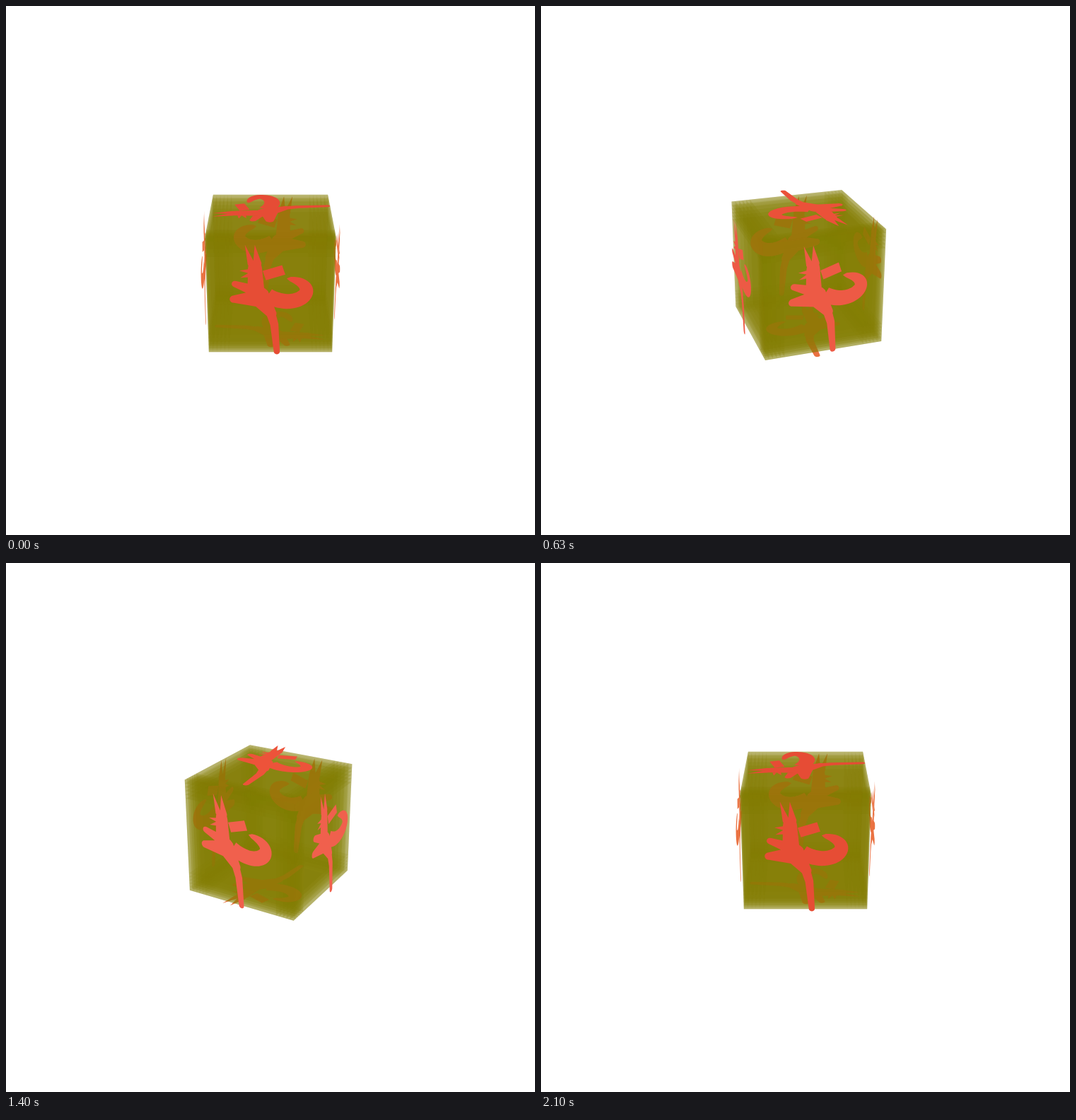
Write an HTML page with a canvas that moves like this. It is 748 by 748 pixels and loops after 2.17 s.

```html
<!DOCTYPE html>
<html lang="en">
<head>
<meta charset="utf-8">
<title>Rotating cube</title>
<style>
html, body { margin: 0; width: 100%; height: 100%; overflow: hidden; background: #fff; }
canvas { display: block; width: 748px; height: 748px; }
</style>
</head>
<body>
<canvas id="stage" width="748" height="748"></canvas>
<script>
const ctx = document.getElementById('stage').getContext('2d');
const MID = 374, VIEW = 1160, HALF = 84, FLOAT = 93.5;
const LAYERS = 6, GAP = 5.4;
const STEP = 70, STEPS = 31, TURN = Math.PI / 15;
const TILT = 24.3 * Math.PI / 180, C = Math.cos(TILT), S = Math.sin(TILT);

// Tapered limb from a to b with a radius at each end; one arc step leaves the ends flat.
function limb(ax, ay, ar, bx, by, br, arcSteps = 8) {
  const dir = Math.atan2(by - ay, bx - ax);
  const arc = (x, y, r, from) => Array.from({ length: arcSteps + 1 }, (_, i) => {
    const t = from + Math.PI * i / arcSteps;
    return [x + r * Math.cos(t), y + r * Math.sin(t)];
  });
  return [...arc(ax, ay, ar, dir + Math.PI / 2), ...arc(bx, by, br, dir - Math.PI / 2)];
}

// Ribbon along a cubic curve that tapers to a point at its end.
function tail(p0, p1, p2, p3, width) {
  const at = t => [0, 1].map(i => (1 - t) ** 3 * p0[i] + 3 * t * (1 - t) ** 2 * p1[i] +
    3 * t * t * (1 - t) * p2[i] + t ** 3 * p3[i]);
  const near = [], far = [];
  for (let t = 0; t <= 1; t += 1 / 32) {
    const [x, y] = at(t), [x0, y0] = at(t - 0.01), [x1, y1] = at(t + 0.01);
    const k = width * Math.sqrt(1 - t ** 2.5) / Math.hypot(x1 - x0, y1 - y0);
    const nx = (y0 - y1) * k, ny = (x1 - x0) * k;
    near.push([x - nx, y - ny]);
    far.unshift([x + nx, y + ny]);
  }
  return near.concat(far);
}

const FOX = [
  limb(-25, -52, 4.5, -32.5, -78, 0),         // ears
  limb(-17, -52, 5.5, -20, -78, 0),
  limb(-24, -41, 4, -40, -42, 0),             // cheek tufts
  limb(-24, -37, 4, -39, -32, 0),
  limb(-20, -46, 9, -19, -14, 11),            // head and neck
  limb(-8, -35, 7, 17, -43, 7, 1),            // snout
  limb(-46, -23, 4.5, -20, -13, 8),           // paw
  limb(-48, -1, 5.5, -18, -2, 12),            // raised thigh
  limb(-15, -5, 14, 1, 20, 7),                // torso
  limb(1, 22, 6, 5, 36, 5.5),                 // standing leg
  limb(5, 36, 5.5, 8.5, 78, 4),
  tail([-4, -6], [38, 20], [72, -23], [21, -31], 11)
];
const SQUARE = [[-HALF, -HALF], [HALF, -HALF], [HALF, HALF], [-HALF, HALF]];

// u: right, v: down, n: outward.
const faces = [0, 1, 2, 3].map(i => {
  const a = i * Math.PI / 2;
  return { u: [Math.cos(a), 0, -Math.sin(a)], v: [0, 1, 0], n: [Math.sin(a), 0, Math.cos(a)] };
});
const lid = { u: [0, 0, -1], v: [1, 0, 0], n: [0, -1, 0] };
const base = { u: [0, 0, -1], v: [-1, 0, 0], n: [0, 1, 0] };
faces.push(lid, base);

function rotate([x, y, z], yaw) {
  const c = Math.cos(yaw), s = Math.sin(yaw);
  const rx = x * c + z * s, rz = z * c - x * s;
  return [rx, y * C + rz * S, rz * C - y * S];
}

function fill(shapes, { u, v, n }, dist, color) {
  ctx.fillStyle = color;
  ctx.beginPath();
  for (const shape of shapes) {
    shape.forEach(([a, b], i) => {
      const [x, y, z] = [0, 1, 2].map(j => u[j] * a + v[j] * b + n[j] * dist);
      const k = VIEW / (VIEW - z);
      ctx[i ? 'lineTo' : 'moveTo'](MID + x * k, MID + y * k);
    });
    ctx.closePath();
  }
  ctx.fill();
}

// Outer sheets are denser than inner ones, and sheets facing the viewer denser still.
function sheets(list, from, to) {
  for (const f of list)
    for (let k = from; k < to; k++) {
      const alpha = (k ? 0.18 : 0.35) + 0.1 * f.n[2];
      fill([SQUARE], f, HALF - k * GAP, `rgba(130,124,0,${alpha})`);
    }
}

function draw(yaw) {
  ctx.clearRect(0, 0, 748, 748);
  const posed = faces.map(f => ({
    u: rotate(f.u, yaw), v: rotate(f.v, yaw), n: rotate(f.n, yaw), flat: f === lid
  }));
  const isFront = f => f.n[2] * VIEW > FLOAT;
  const front = posed.filter(isFront), back = posed.filter(f => !isFront(f));

  sheets(front, 1, LAYERS);
  for (const f of back) fill(FOX, f, FLOAT, 'rgba(232,95,40,0.88)');
  sheets(back, 0, LAYERS);
  sheets(front, 0, 1);

  // Red brightens as the cube turns its edge to the viewer.
  const m = Math.abs(Math.sin(2 * yaw));
  const sideRed = `rgb(${230 + 12 * m},${77 + 22 * m},${53 + 28 * m})`;
  const lidRed = `rgb(${230 + 8 * m},${76 + 8 * m},${53 + 6 * m})`;
  for (const f of front) fill(FOX, f, FLOAT, f.flat ? lidRed : sideRed);
}

const start = performance.now();
function tick() {
  const n = Math.floor((performance.now() - start) / STEP) % STEPS;
  draw(n * TURN);
  requestAnimationFrame(tick);
}
tick();
</script>
</body>
</html>
```
